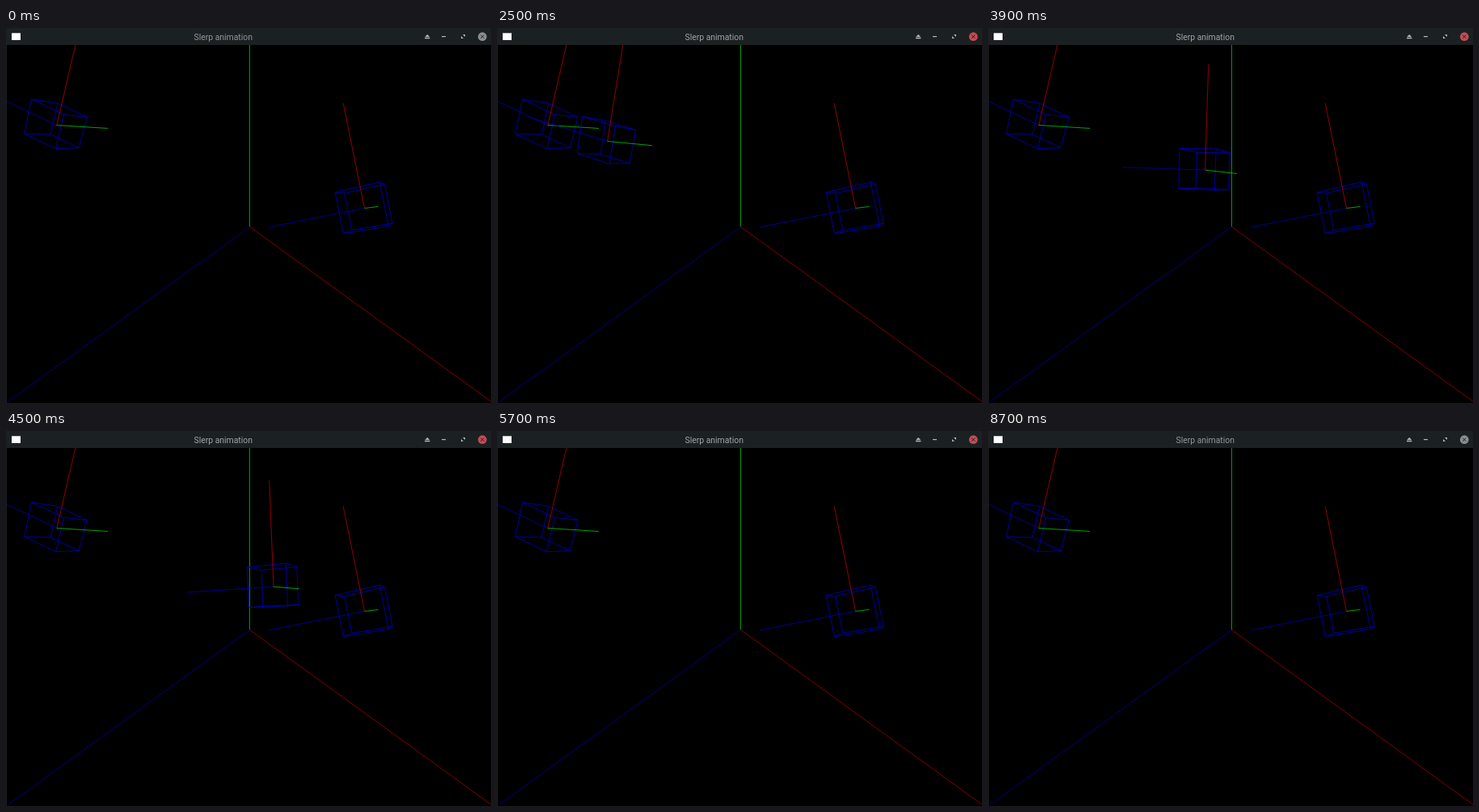
Write an HTML page that moves like this. It is 600 px wide and 465 px high and loops after 8800 ms.

```html
<!DOCTYPE html>
<html lang="en">
<head>
<meta charset="utf-8">
<title>Slerp animation</title>
<style>
  html, body { margin: 0; width: 100%; height: 100%; overflow: hidden; background: #000; }
  svg { display: block; }
  text { font: 10.4px Roboto, "Noto Sans", sans-serif; }
</style>
</head>
<body>
<svg width="600" height="465" viewBox="0 0 600 465">
  <defs><clipPath id="view"><rect x="1" y="21" width="599" height="444"/></clipPath></defs>
  <rect width="600" height="465"/>
  <g clip-path="url(#view)">
    <g transform="translate(.5 .5)" fill="none" stroke-width=".8">
      <path d="M301 246V20" stroke="#009c00" stroke-width="1"/>
      <path d="M301 246L600 463" stroke="#a40000"/>
      <path d="M301 246L2 463" stroke="#0000a0"/>
      <g id="bodies"></g>
    </g>
  </g>
  <rect width="600" height="21" fill="#1b2023"/>
  <rect y="21" width="1" height="444" fill="#1b2023"/>
  <rect x="7" y="6" width="11" height="9" fill="#fff"/>
  <path d="M7 6.5h11" stroke="#b8bcbe"/>
  <text id="caption" x="232.5" y="14.6">Slerp animation</text>
  <g fill="#b4b8ba">
    <path d="M518 11.2L521.2 8L524.4 11.2ZM518 12h6.400v1.200h-6.400Z"/>
    <rect x="539" y="10" width="5" height="1.200"/>
    <path d="M565 8h3v3ZM563 10v3h3Z"/>
  </g>
  <circle id="close" cx="589.3" cy="10.7" r="5.400"/>
  <path d="M587.3 8.700l4 4m0-4l-4 4" stroke="#1b2023"/>
</svg>
<script>
const LOOP = 8800, STEP = 100;
const MOVE_START = 1627, MOVE_TIME = 3867;
const CENTER = [301, 246], FOCAL = 390;
const AXIS = 134, HALF = 25.4;

// Camera space: x right, y down, z forward; q is [w, x, y, z].
const startPose = pose(62.3, 120, FOCAL / 0.825, [0.5382, 0.6427, -0.281, -0.4673]);
const endPose = pose(443, 223, FOCAL, [0.5545, 0.3142, -0.397, -0.661]);

function pose(sx, sy, depth, q) {
  const k = depth / FOCAL;
  return { p: [(sx - CENTER[0]) * k, (sy - CENTER[1]) * k, depth], q };
}

function slerp(a, b, u) {
  const angle = Math.acos(Math.min(1, a.reduce((sum, v, i) => sum + v * b[i], 0)));
  const s = Math.sin(angle);
  const wa = Math.sin((1 - u) * angle) / s, wb = Math.sin(u * angle) / s;
  return a.map((v, i) => v * wa + b[i] * wb);
}

function blend(a, b, u) {
  return { p: a.p.map((v, i) => v + (b.p[i] - v) * u), q: slerp(a.q, b.q, u) };
}

function basis([w, x, y, z]) {
  return [
    [1 - 2 * (y * y + z * z), 2 * (x * y + w * z), 2 * (x * z - w * y)],
    [2 * (x * y - w * z), 1 - 2 * (x * x + z * z), 2 * (y * z + w * x)],
    [2 * (x * z + w * y), 2 * (y * z - w * x), 1 - 2 * (x * x + y * y)]
  ];
}

function project({ p, q }) {
  const axes = basis(q);
  return local => {
    const v = p.map((c, i) => c + axes.reduce((sum, a, j) => sum + a[i] * local[j], 0));
    return CENTER.map((c, i) => (c + v[i] * FOCAL / v[2]).toFixed(2)).join(" ");
  };
}

const corner = n => [0, 1, 2].map(bit => (n >> bit & 1 ? HALF : -HALF));
const edges = [];
for (let n = 0; n < 8; n++)
  for (const bit of [1, 2, 4])
    if (!(n & bit)) edges.push([corner(n), corner(n | bit)]);

const bodies = document.getElementById("bodies");

function makeBody() {
  const group = document.createElementNS(bodies.namespaceURI, "g");
  bodies.append(group);
  const paths = ["#0000c8", "#0000b4", "#b80000", "#00cc00"].map(color => {
    const path = document.createElementNS(bodies.namespaceURI, "path");
    path.setAttribute("stroke", color);
    group.append(path);
    return path;
  });
  return {
    group,
    place(state) {
      const at = project(state);
      const line = (a, b) => `M${at(a)}L${at(b)}`;
      const zero = [0, 0, 0];
      const shapes = [
        edges.map(e => line(...e)).join(""),
        line(zero, [0, 0, AXIS]),
        line(zero, [AXIS, 0, 0]),
        line(zero, [0, AXIS, 0])
      ];
      paths.forEach((path, i) => path.setAttribute("d", shapes[i]));
    }
  };
}

makeBody().place(startPose);
makeBody().place(endPose);
const mover = makeBody();
const caption = document.getElementById("caption");
const closeButton = document.getElementById("close");

const mix = (a, b, u) => `rgb(${a.map((v, i) => Math.round(v + (b[i] - v) * u))})`;

function render(time) {
  const t = Math.floor(time % LOOP / STEP) * STEP;
  const u = (t - MOVE_START) / MOVE_TIME;
  const moving = u > 0 && u < 1;
  mover.group.style.display = moving ? "" : "none";
  if (moving) mover.place(blend(startPose, endPose, u));

  const focus = t >= 8700 ? 0 : Math.max(0, Math.min(1, (t - 800) / 300));
  caption.setAttribute("fill", mix([146, 151, 153], [160, 164, 166], focus));
  closeButton.setAttribute("fill", mix([138, 142, 144], [196, 76, 82], focus));
}

const origin = performance.now();
function tick() {
  render(performance.now() - origin);
  requestAnimationFrame(tick);
}
tick();
</script>
</body>
</html>
```
